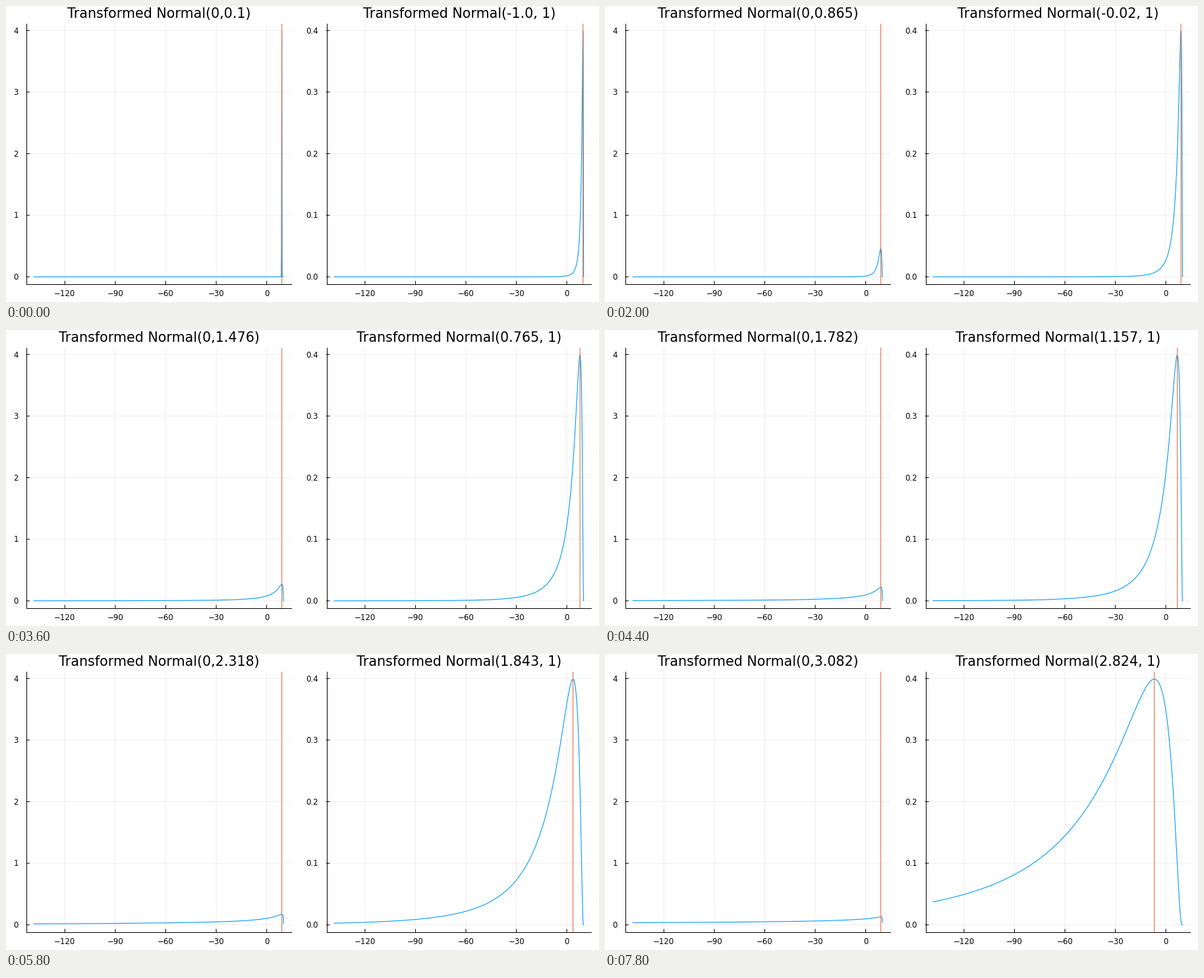
A matplotlib script for the animation above (8 s loop, 900 px wide and 450 px high).

```python
import numpy as np
import matplotlib.pyplot as plt
from matplotlib.animation import FuncAnimation

W, H, DPI = 900, 450, 100
FRAMES, STEP_MS = 40, 200
PX = 72 / DPI  # points per pixel
BLUE, ORANGE = "#009afa", "#e26f46"

plt.rcParams["font.family"] = "DejaVu Sans"
fig = plt.figure(figsize=(W / DPI, H / DPI), dpi=DPI, facecolor="white")
ax = fig.add_axes([0, 0, 1, 1])
ax.set(xlim=(0, W), ylim=(H, 0))
ax.axis("off")

TOP, BOTTOM, WIDTH = 27, 423, 401.5
PAD = 0.03
z = np.linspace(-5, 5, 1001)
x = 10 - np.exp(z)
x_span = x[0] - x[-1]
PEAK = 1 / np.sqrt(2 * np.pi)


def pdf(mu, sigma):
    return PEAK / sigma * np.exp(-0.5 * ((z - mu) / sigma) ** 2)


def line(xs, ys, color="black", width=1.0, **kw):
    return ax.plot(xs, ys, color=color, lw=width * PX, **kw)[0]


def label(px, py, text, size, ha):
    return ax.text(px, py, text, fontsize=size * PX, ha=ha, va="baseline")


class Panel:
    def __init__(self, left, y_max, y_ticks, title_x):
        self.left, self.y_max = left, y_max
        right = left + WIDTH
        for v in range(-120, 1, 30):
            px = self.px(v)
            line([px, px], [TOP, BOTTOM], alpha=0.07, snap=False)
            line([px, px], [BOTTOM, BOTTOM - 4.5], snap=False)
            label(px, 441, str(v).replace("-", "\u2212"), 11.8, "center")
        for text in y_ticks:
            py = self.py(float(text))
            line([left, right], [py, py], alpha=0.07, snap=False)
            line([left, left + 4.5], [py, py], snap=False)
            label(left - 12.3, py + 4.3, text, 11.8, "right")
        line([left, left], [TOP, BOTTOM])
        line([left, right], [BOTTOM, BOTTOM])
        self.curve = line([], [], BLUE, 1.1, zorder=3)
        self.mode = line([], [], ORANGE, 1.1, zorder=4, snap=False,
                         solid_capstyle="butt")
        self.title = label(title_x, 18, "", 20.6, "center")

    def px(self, v):
        share = (v - x[-1]) / x_span + PAD
        return self.left + WIDTH * share / (1 + 2 * PAD)

    def py(self, v):
        share = v / self.y_max + PAD
        return BOTTOM - (BOTTOM - TOP) * share / (1 + 2 * PAD)

    def show(self, mu, sigma, params):
        self.curve.set_data(self.px(x), self.py(pdf(mu, sigma)))
        mode = self.px(10 - np.exp(mu))
        self.mode.set_data([mode, mode], [TOP, BOTTOM])
        self.title.set_text(f"Transformed Normal({params})")
        return self.curve, self.mode, self.title


spread = Panel(31, PEAK * 10, ["0", "1", "2", "3", "4"], 232.4)
shift = Panel(486.5, PEAK, ["0.0", "0.1", "0.2", "0.3", "0.4"], 688)


def draw(i):
    sigma = 0.1 + 3.9 * i / 51
    mu = -1 + 5 * i / 51
    return (*spread.show(0, sigma, f"0,{round(sigma, 3)}"),
            *shift.show(mu, 1, f"{round(mu, 3)}, 1"))


anim = FuncAnimation(fig, draw, frames=FRAMES, interval=STEP_MS,
                     init_func=lambda: draw(0), repeat=True, repeat_delay=0)
plt.show()
```
